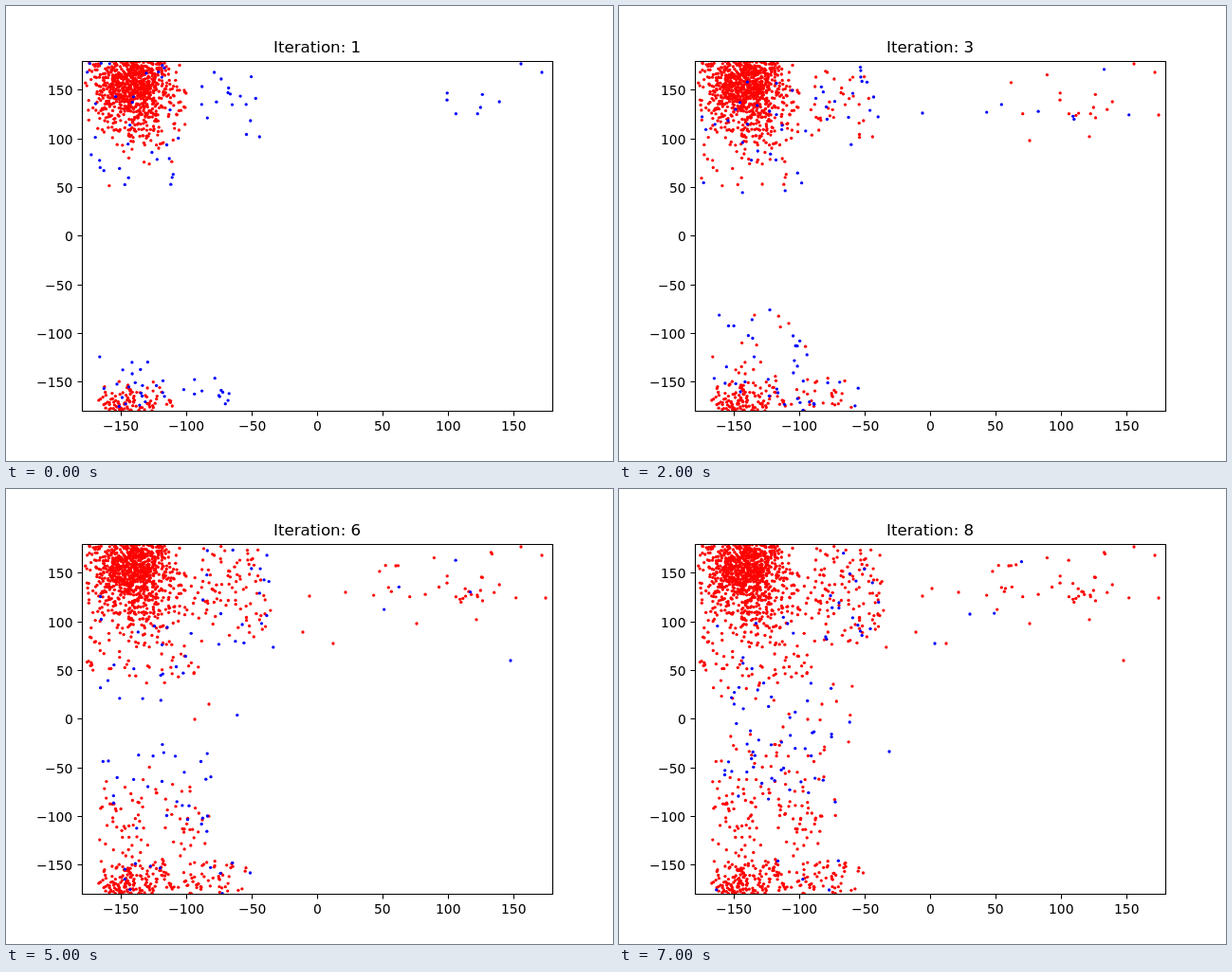
Recreate the animation shown at these times as an HTML page. Size 640 by 480 pixels, loop 8000 ms.

```html
<!DOCTYPE html>
<html lang="en">
<head>
<meta charset="utf-8">
<title>Iterations</title>
<style>
  html, body { margin: 0; width: 100%; height: 100%; overflow: hidden; background: #fff; }
  svg { display: block; width: 640px; height: 480px; }
  text { font: 13.89px "DejaVu Sans", sans-serif; }
  #title { font-size: 16.67px; }
  #axes { fill: none; stroke: #000; stroke-width: 1.1; }
</style>
</head>
<body>
<svg viewBox="0 0 640 480">
  <clipPath id="inside"><rect x="80" y="58" width="496.5" height="369.5"/></clipPath>
  <g id="dots" clip-path="url(#inside)"></g>
  <path id="axes"/>
  <g id="labels"></g>
  <text id="title"></text>
</svg>
<script>
const NS = 'http://www.w3.org/2000/svg';
const STEP = 1000, COUNT = 8;
const dots = document.getElementById('dots');
const labels = document.getElementById('labels');
const title = document.getElementById('title');

let seed = 20;
function rand() {
  seed = (seed + 0x6D2B79F5) | 0;
  let t = Math.imul(seed ^ (seed >>> 15), 1 | seed);
  t = (t + Math.imul(t ^ (t >>> 7), 61 | t)) ^ t;
  return ((t ^ (t >>> 14)) >>> 0) / 4294967296;
}
const between = (a, b) => a + (b - a) * rand();
const normal = () => Math.sqrt(-2 * Math.log(1 - rand())) * Math.cos(2 * Math.PI * rand());

function add(parent, name, attrs) {
  const el = document.createElementNS(NS, name);
  for (const k in attrs) el.setAttribute(k, attrs[k]);
  return parent.appendChild(el);
}
const group = () => add(dots, 'g', { fill: '#f00' });
const dot = (g, x, y) => add(g, 'circle', { cx: x.toFixed(1), cy: y.toFixed(1), r: 1.65 });

function patch(g, n, x0, x1, y0, y1) {
  while (n-- > 0) dot(g, between(x0, x1), between(y0, y1));
}

// Normal cloud, cut off at the plot edges and at xMax
function cloud(g, n, cx, cy, sx, sy, xMax) {
  while (n > 0) {
    const x = cx + sx * normal(), y = cy + sy * normal();
    if (x < 81 || x > xMax || y < 58 || y > 427) continue;
    dot(g, x, y);
    n--;
  }
}

const base = group();
cloud(base, 600, 131, 80, 18, 23, 190);
cloud(base, 230, 146, 94, 28, 31, 190);
cloud(base, 95, 134, 424, 21, 12, 190);

// Far outliers: [generation, x, y]
const loners = [
  [0, 543, 61], [0, 565, 70], [1, 569, 115], [1, 433, 142], [2, 320, 113],
  [3, 313, 151], [3, 214, 227], [4, 358, 109], [4, 345, 163], [4, 199, 243],
  [5, 532, 181], [6, 330, 105], [7, 370, 132], [7, 333, 163], [7, 285, 277]];

// Each generation pushes the upper front down and the lower front up until they meet
function generation(k) {
  const g = group(), rise = 337 - 12 * k;
  patch(g, 32 - 3 * k, 84, 190 + 5 * k, 60 + 10 * k, 190 + 5 * k);
  patch(g, 17, 200 + 2 * k, 268 + 3 * k, 60, 142 + 5 * k);
  patch(g, Math.min(8 + 5 * k, 24), 98, 190 + 7 * k, rise, rise + 85);
  patch(g, 26 - 3 * k, 100, 250 + 2 * k, 392, 427);
  patch(g, 8 * (k - 4), 115, 248, 205, 285);
  cloud(g, 7 - k, 490, 104, 22, 20, 576);
  cloud(g, k ? 2 : 0, 405, 98, 10, 20, 576);
  for (const [i, x, y] of loners) if (i === k) dot(g, x, y);
  return g;
}
const steps = Array.from({ length: COUNT }, (_, k) => generation(k));

// Text starts on a whole pixel; align is 0.5 for centred, 1 for right
function place(el, text, x, y, align) {
  el.textContent = text;
  el.setAttribute('x', Math.round(x - align * el.getComputedTextLength() + 0.2));
  el.setAttribute('y', Math.round(y));
}

const snap = v => Math.floor(v + 0.5) + 0.5;
let path = 'M80.5 58.5H576.5V427.5H80.5Z';
for (let v = -150; v <= 150; v += 50) {
  const x = 328 + v * 496 / 360, y = 242.4 - v * 369.6 / 360;
  const name = String(v).replace('-', '\u2212');
  path += `M${snap(x)} 427.5v5M80.5 ${snap(y)}h-5`;
  place(add(labels, 'text'), name, x, 448, 0.5);
  place(add(labels, 'text'), name, 70.3, y + 5.9, 1);
}
document.getElementById('axes').setAttribute('d', path);

let shown = -1;
function draw(now) {
  const k = Math.floor(now / STEP) % COUNT;
  if (k !== shown) {
    shown = k;
    place(title, 'Iteration: ' + (k + 1), 328, 49, 0.5);
    steps.forEach((g, i) => {
      g.setAttribute('fill', i === k ? '#00f' : '#f00');
      g.setAttribute('display', i <= k ? 'inline' : 'none');
    });
  }
  requestAnimationFrame(draw);
}
draw(performance.now());
</script>
</body>
</html>
```
